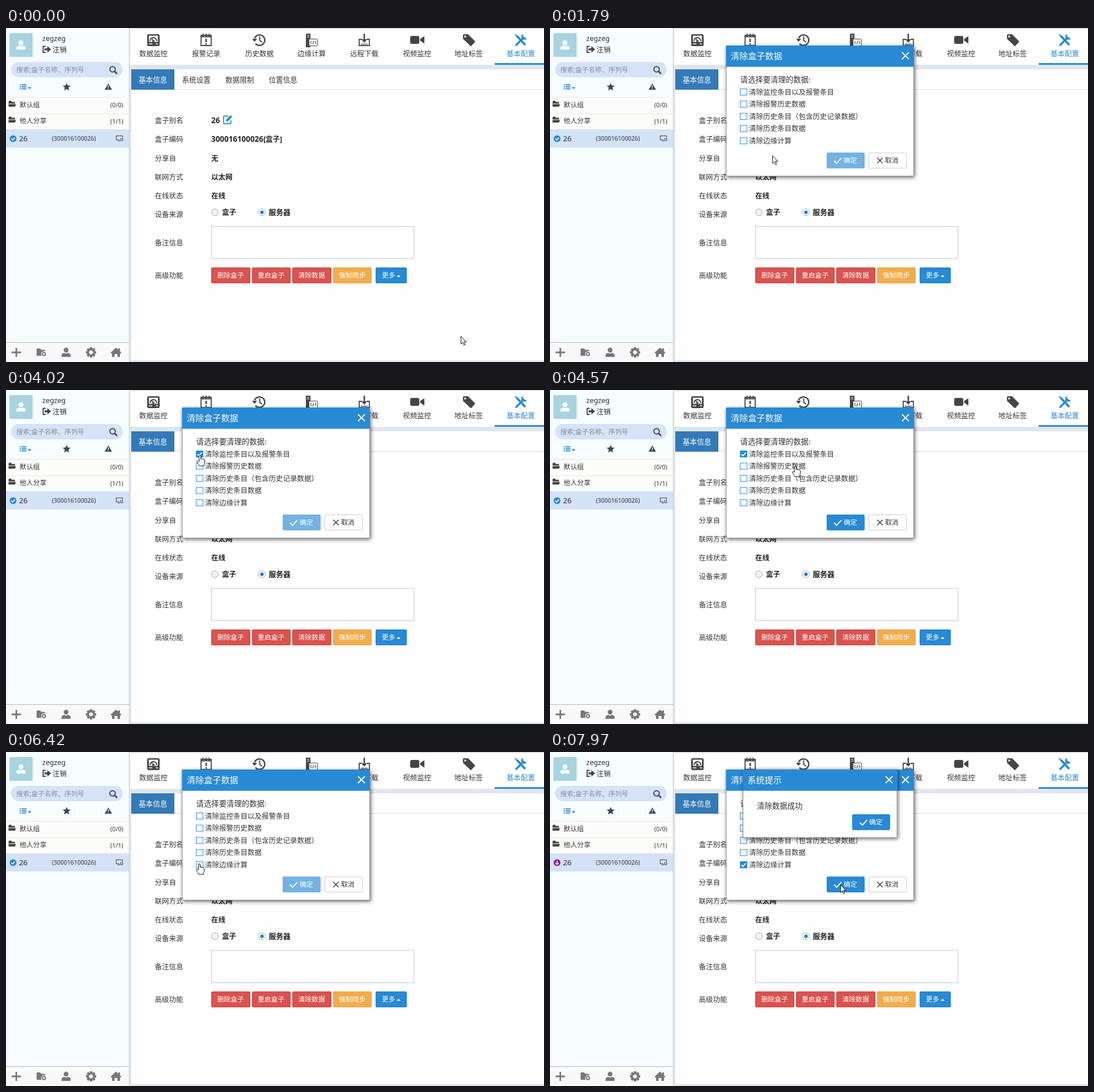
These frames come from a looping animation (949 px wide and 590 px high, 8000 ms). An HTML page:

```html
<!DOCTYPE html>
<html lang="zh-CN">
<head>
<meta charset="utf-8">
<style>
html, body { margin: 0; width: 100%; height: 100%; overflow: hidden; background: #fff; }
svg { display: block; font-family: 'Noto Sans', 'Noto Sans CJK SC', 'Noto Sans CJK', sans-serif; }
</style>
</head>
<body>
<svg id="stage" width="949" height="590" viewBox="0 0 949 590"></svg>
<script>
const BLUE = '#2889d4', INK = '#333', ICON = '#454545';
const stage = document.getElementById('stage');

// ---- drawing helpers ----
const rect = (x, y, w, h, fill, extra = '') =>
  `<rect x="${x}" y="${y}" width="${w}" height="${h}" fill="${fill}" ${extra}/>`;
const box = (x, y, w, h, fill, line, r = 0, extra = '') =>
  rect(x + .5, y + .5, w - 1, h - 1, fill, `stroke="${line}" rx="${r}" ${extra}`);
const fillPath = (d, c) => `<path d="${d}" fill="${c}"/>`;
const line = (d, c, w = 1, extra = '') =>
  `<path d="${d}" fill="none" stroke="${c}" stroke-width="${w}" ${extra}/>`;
const dot = (x, y, r, c, extra = '') => `<circle cx="${x}" cy="${y}" r="${r}" fill="${c}" ${extra}/>`;
const group = (body, extra) => `<g ${extra}>${body}</g>`;
const at = (x, y, body, extra = '') => group(body, `transform="translate(${x} ${y})" ${extra}`);
// cy is the vertical middle of the line of text
const text = (x, cy, s, size = 12.5, c = INK, extra = '') =>
  `<text x="${x}" y="${cy + size * .37}" font-size="${size}" fill="${c}" ${extra}>${s}</text>`;
const bold = (x, cy, s, size = 12.5) => text(x, cy, s, size, '#222', 'font-weight="700"');
const cross = (x, y, r, c, w) =>
  line(`M${x - r} ${y - r}L${x + r} ${y + r}M${x + r} ${y - r}L${x - r} ${y + r}`, c, w);
const tick = (x, y, k, c, w) => line(`M${x - k} ${y}l${k * .7} ${k * .7}l${k * 1.3} ${-k * 1.4}`, c, w);
const person = (s, c) => group(dot(0, -4, 4.3, c) +
  fillPath('M-8 8V5.5Q-8 1 -3 1Q0 3 3 1Q8 1 8 5.5V8Z', c), `transform="scale(${s})"`);
function gear(r, c, hole) {
  let s = '';
  for (let a = 0; a < 360; a += 45)
    s += rect(-r * .24, -r, r * .48, r * .5, c, `transform="rotate(${a})"`);
  return s + dot(0, 0, r * .6, 'none', `stroke="${c}" stroke-width="${r * hole}"`);
}

// ---- top navigation ----
const navIcons = [
  box(-11, -10, 22, 21, ICON, ICON, 2) + rect(-8, -7.5, 16, 11, '#fff') +
    line('M-6 2A6 6 0 0 1 6 2', ICON, 2) + line('M0 2L-3 -3', ICON, 1.6) + dot(0, 2, 2, ICON) +
    line('M-8 7H-2M4 7H8', '#fff', 1.5),
  line('M-9 -8H9V10H-9ZM-9 -5.5H9', ICON, 1.8) + line('M-5.5 -11V-5M0 -11V-5M5.5 -11V-5', ICON, 2) +
    line('M0 -2V4M0 6V8.5', ICON, 2.6),
  line('M-8.5 -3A9.3 9.3 0 1 1 -7 6.5', ICON, 2.4) + fillPath('M-13 -2H-4L-8.5 3.5Z', ICON) +
    line('M.5 -6V1L5 4', ICON, 2),
  rect(-10, -11, 8, 24, ICON) + line('M-8 -8H-4M-8 -5H-4', '#fff', 1) +
    box(-5, -2, 16, 13, '#fff', ICON, 1) +
    line('M0 2L-2 4.5L0 7M6 2L8 4.5L6 7M4 1.5L2 7.5', ICON, 1.1),
  line('M-4 -1H-9V10H9V-1H4', ICON, 1.8) + line('M0 -11V1', ICON, 2.6) +
    fillPath('M-5 -1H5L0 5Z', ICON) + line('M-6 7.5H6', ICON, 1.2),
  rect(-12, -7, 16, 14, ICON, 'rx="3"') + fillPath('M5.5 -1.5L13 -6.5V6.5L5.5 1.5Z', ICON),
  fillPath('M-10 -8Q-10 -10 -8 -10H-1L11 2Q12 3 11 4L5 10.5Q4 11.5 3 10.5L-10 -2Z', ICON) +
    dot(-6, -6, 1.8, '#fff'),
  line('M-7 -7L8 9', BLUE, 4) + line('M-10 -10L-2 -2', BLUE, 2) + line('M-8 9L5 -4', BLUE, 3.6, 'stroke-linecap="round"') +
    line('M3.5 -9A4.2 4.2 0 1 0 9.5 -3', BLUE, 3)
];
const navNames = ['数据监控', '报警记录', '历史数据', '边缘计算', '远程下载', '视频监控', '地址标签', '基本配置'];
const navX = [260, 353, 447, 539, 632, 725, 816, 908];

function header() {
  let s = rect(217, 65, 732, 8, '#dfe6ec') + rect(217, 0, 4, 590, '#dfe6ec') +
    rect(219, 0, 730, 65, '#fff') + rect(862, 62, 87, 3, BLUE) + rect(217, 0, 1, 590, '#c4cace');
  navNames.forEach((n, i) => {
    s += at(navX[i], 21, navIcons[i]) + text(navX[i] - 25, 45.5, n, 12.5, i == 7 ? BLUE : INK);
  });
  s += rect(297, 108, 652, 1, '#ddd') + rect(221, 73, 76, 36, '#337ab7') +
    text(234, 91, '基本信息', 12.6, '#fff');
  ['系统设置', '数据限制', '位置信息'].forEach((n, i) => s += text(310.5 + i * 76.5, 91, n, 12.6));
  return s + rect(221, 587, 728, 3, '#dfe6ec') + rect(0, 0, 949, 1, '#ccc');
}

// ---- left panel ----
const folder = fillPath('M0 2Q0 0 2 0H4L6 2H10Q11.5 2 11.5 3.5V5H0ZM0 6H13L11.5 10.5H0Z', '#444');

function sidebar() {
  const g = '#777';
  return rect(0, 0, 217, 590, '#f6fcff') +
    rect(6, 9, 41, 42, '#a8d3e1') + at(26.5, 30, person(1, '#fff')) +
    text(64, 18, 'zegzeg', 12.5) +
    line('M70 32.5H65.5V43H70', ICON, 2) + fillPath('M68 36H73V32L79.5 37.7L73 43.5V39.5H68Z', ICON) +
    text(82, 38.5, '注销') +
    rect(9, 60, 197, 27, '#d4e3f7', 'rx="13.5"') + text(18, 74, '搜索;盒子名称、序列号', 11.7, '#8b8f96') +
    dot(188, 73, 4.8, 'none', `stroke="${ICON}" stroke-width="2"`) + line('M191.5 76.5L196 81', ICON, 2.6) +
    line('M24 100.5H26M24 104H26M24 107.5H26M27.5 100.5H36M27.5 104H36M27.5 107.5H36', BLUE, 1.8) +
    fillPath('M38 104.5H45L41.5 108Z', BLUE) +
    fillPath('M107 97L109 101.5L114 102L110.3 105.3L111.4 110.3L107 107.7L102.6 110.3L103.7 105.3L100 102L105 101.5Z', ICON) +
    fillPath('M180.5 98L187 109H174Z', ICON) + line('M180.5 101.5V105M180.5 106V107.6', '#fff', 1.5) +
    rect(0, 122, 217, 57, '#fcfdfb') + rect(0, 122, 217, 1, '#e3e6e8') + rect(0, 151, 217, 1, '#e3e6e8') +
    at(4.5, 128.5, folder) + text(24, 135.5, '默认组', 11.9) + text(184, 136.5, '(0/0)', 10.8) +
    at(4.5, 156.5, folder) + text(24, 163.5, '他人分享', 11.9) + text(184, 165, '(1/1)', 10.8) +
    rect(0, 179, 217, 32, '#d3e2f7') + text(23, 195, '26', 13.2) + text(81, 195.5, '(300016100026)', 10.4) +
    group(dot(12.5, 195.5, 6, BLUE) + tick(12.5, 195.7, 3, '#fff', 1.7), 'id="online"') +
    group(dot(12.5, 195.5, 6, '#8d14a8') + line('M12.5 192V198.5M9.8 196L12.5 198.7L15.2 196', '#fff', 1.5), 'id="busy"') +
    line('M200 197.5H194.5V190.5H205.5V194M197 199.5H201', '#444', 1.1) + line('M202 195.5H206V199H202Z', '#444', 1) +
    rect(0, 555, 217, 35, '#f8f9f8') + rect(0, 555, 217, 1, '#b4b8ba') +
    line('M10 573H26.5M18.2 565V581', g, 2.8) +
    fillPath('M54 567.5Q54 566 55.5 566H60L62 568.5H67.5Q69 568.5 69 570V579H54Z', g) +
    at(67, 576, dot(0, 0, 5, '#f8f9f8') + gear(4, g, .35)) +
    at(106, 573, person(1, g)) + at(150, 573, gear(9, g, .4)) +
    fillPath('M184.5 573.5L194 564.5L198 568V566H201V571L203.5 573.5L202 575H201V581H196.5V576H191.5V581H187V575H186Z', g);
}

// ---- settings form ----
const caret = fillPath('M689 439.5H696L692.5 436Z', '#fff');

function button(x, y, w, label, fill, edge, tx, id = '') {
  return box(x, y, w, 28, fill, edge, 1.5, id && `id="${id}"`) + text(tx, y + 14, label, 11.8, '#fff');
}
function form() {
  const ys = [163, 196.5, 230, 263, 296.5, 329.5, 379.5, 437.5];
  const names = ['盒子别名', '盒子编码', '分享自', '联网方式', '在线状态', '设备来源', '备注信息', '高级功能'];
  const red = '#d9534f', edge = '#d43f3a';
  return names.map((n, i) => text(262.5, ys[i], n)).join('') +
    bold(362, 163, '26', 13.4) +
    line('M392 155.5H385Q383.8 155.5 383.8 156.7V168Q383.8 169.2 385 169.2H395.5Q396.7 169.2 396.7 168V163', BLUE, 1.8) +
    fillPath('M388 165.5L388.8 161.5L396 154L399 157L391.8 164.6Z', BLUE) +
    bold(362, 196.5, '300016100026<tspan font-size="12.5">[盒子]</tspan>', 13.4) +
    bold(362, 230, '无') + bold(362, 263.5, '以太网') + bold(362, 296.5, '在线') +
    dot(368.5, 325.5, 6, '#f1f1f1', 'stroke="#aaa"') + bold(381, 325.5, '盒子') +
    dot(451.5, 325.5, 6, '#fff', 'stroke="#8ba9c2"') + dot(451.5, 325.5, 3, '#1f73b8') + bold(463.5, 325.5, '服务器', 12.8) +
    box(362, 350, 358, 58, '#fff', '#b5cbd9') +
    button(362, 423, 69, '删除盒子', red, edge, 372.5) +
    button(434, 423, 68, '重启盒子', red, edge, 444) +
    button(505, 423, 69, '清除数据', red, edge, 515.5, 'wipe') +
    button(577, 423, 68, '强制同步', '#f0ad4e', '#eea236', 587) +
    button(652, 423, 55, '更多', BLUE, '#2480c8', 663) + caret;
}

// ---- dialogs ----
const rowY = i => 113 + i * 21.55;
const rowNames = ['清除监控条目以及报警条目', '清除报警历史数据', '清除历史条目（包含历史记录数据）', '清除历史条目数据', '清除边缘计算'];

const frame = (x, w, h, title, closeX) =>
  group(box(x, 31, w, h, '#fff', '#8a97a0'), 'filter="url(#shade)"') +
  rect(x, 31, w, 37.5, BLUE) + text(x + 8.5, 49.5, title, 15.1, '#fff') + cross(closeX, 49, 6, '#fff', 1.9);

function dialog() {
  const rows = rowNames.map((n, i) => {
    const y = rowY(i);
    return box(335, y - 6, 13, 12, '#fff', BLUE) +
      group(rect(335.5, y - 6, 12, 12, BLUE) + tick(341.5, y + .3, 4, '#fff', 1.8), `id="tick${i}"`) +
      text(351, y, n);
  }).join('');
  return frame(310.5, 331.5, 231, '清除盒子数据', 627) + text(335.5, 91, '请选择要清理的数据:', 13.4) + rows +
    button(488, 220, 67, '确定', BLUE, BLUE, 518, 'ok') + tick(507.5, 234.5, 6.5, '#fff', 1.9) +
    box(562, 220, 67, 28, '#fff', '#ccc', 1.5) + cross(582, 234, 4.7, INK, 1.4) + text(591, 234, '取消', 11.8);
}
const notice = () => frame(340, 272.5, 120.5, '系统提示', 598) + text(365, 95.5, '清除数据成功', 13.4) +
  button(533, 110, 67, '确定', BLUE, BLUE, 563) + tick(553, 124.5, 6.5, '#fff', 1.9);

const arrow = '<path id="arrow" d="M.5 .5V14L3.6 11.2L5.8 16.3L7.9 15.4L5.7 10.5H9.9Z" fill="#fff" stroke="#111"/>';
const hand = '<path id="hand" d="M-1.4 12V3a1.4 1.4 0 0 1 2.9 0V8c0-1.5 2.5-1.5 2.5 .3c.2-1.3 2.4-1.2 2.4 .5c.3-1.1 2.1-.8 2.1 .8V14c0 2.2-1.4 3-1.4 6H-1.2c0-2.3-2.9-4-4.2-7.2c-.6-1.6 1-2.3 2.1-1.1Z" fill="#fff" stroke="#111" stroke-linejoin="round"/>';

stage.innerHTML =
  '<defs><filter id="shade" x="-10%" y="-20%" width="120%" height="140%"><feDropShadow dx="1.5" dy="2" stdDeviation="3.6" flood-opacity=".6"/></filter></defs>' +
  rect(0, 0, 949, 590, '#fefefe') + header() + sidebar() + form() +
  group(dialog(), 'id="dialog"') + group(notice(), 'id="notice"') + group(arrow + hand, 'id="cursor"');

// ---- motion ----
const $ = id => document.getElementById(id);
const show = (id, on) => $(id).setAttribute('display', on ? 'inline' : 'none');
const paint = (id, fill, edge) => { $(id).setAttribute('fill', fill); $(id).setAttribute('stroke', edge); };

// Pointer moves: first step, last step, number of steps, end x, end y
const moves = [
  [70, 150, 2, 720, 440], [230, 310, 2, 590, 389], [390, 460, 2, 547, 444],
  [1160, 1160, 1, 498, 378],
  [1480, 1790, 5, 392, 225], [2250, 2480, 4, 391, 190],
  [2630, 3100, 7, 362, 157], [3170, 3400, 4, 348, 126], [3480, 3630, 3, 342, 114],
  [4100, 4570, 7, 433, 133], [4650, 4820, 3, 431, 139], [4870, 5190, 5, 342, 112],
  [5810, 6420, 9, 341, 196], [6730, 7280, 8, 512, 234]
];
const ease = p => p * p * (3 - 2 * p) * .5 + p * .5;

function pointer(t) {
  let x = 802, y = 544;
  for (const [a, b, n, ex, ey] of moves) {
    if (t < a) break;
    const k = t >= b ? n : Math.floor((t - a) / (b - a) * (n - 1) + .01) + 1;
    const p = ease(k / n);
    x += (ex - x) * p;
    y += (ey - y) * p;
  }
  return [x, y];
}
const inside = (x, y, l, t, r, b) => x >= l && x <= r && y >= t && y <= b;

function update(t) {
  const open = t >= 930, done = t >= 7890;
  const [x, y] = pointer(t);
  const overWipe = !open && inside(x, y, 505, 423, 574, 451);
  const row = Math.floor((y - rowY(0)) / 21.55 + .5);
  const overRow = open && row >= 0 && row < 5 && inside(x, y, 335, 102, 351 + rowNames[row].length * 12.5, 210);
  const overOk = open && !done && inside(x, y, 488, 220, 555, 248);

  show('dialog', open);
  show('notice', done);
  show('busy', t >= 7970);
  show('online', t < 7970);

  const first = t >= 4020 && t < 5420, last = t >= 6650;
  for (let i = 0; i < 5; i++) show('tick' + i, i == 0 ? first : i == 4 && last);

  if (overWipe && t >= 780) paint('wipe', '#a52725', '#5d3f78');
  else if (overWipe) paint('wipe', '#c9302c', '#ac2925');
  else paint('wipe', '#d9534f', '#d43f3a');

  const ready = t >= 4100 && t < 5500 || t >= 6730;
  if (!ready) paint('ok', '#74b2e3', '#74b2e3');
  else if (overOk && t >= 7660) paint('ok', '#1d659f', '#174f7d');
  else if (overOk) paint('ok', '#2176b9', '#2176b9');
  else paint('ok', BLUE, BLUE);

  const isHand = overWipe || overRow || overOk;
  show('hand', isHand);
  show('arrow', !isHand);
  $('cursor').setAttribute('transform', `translate(${Math.round(x)} ${Math.round(y)})`);
}

const start = performance.now();
function loop() {
  update((performance.now() - start) % 8000);
  requestAnimationFrame(loop);
}
loop();
</script>
</body>
</html>
```
